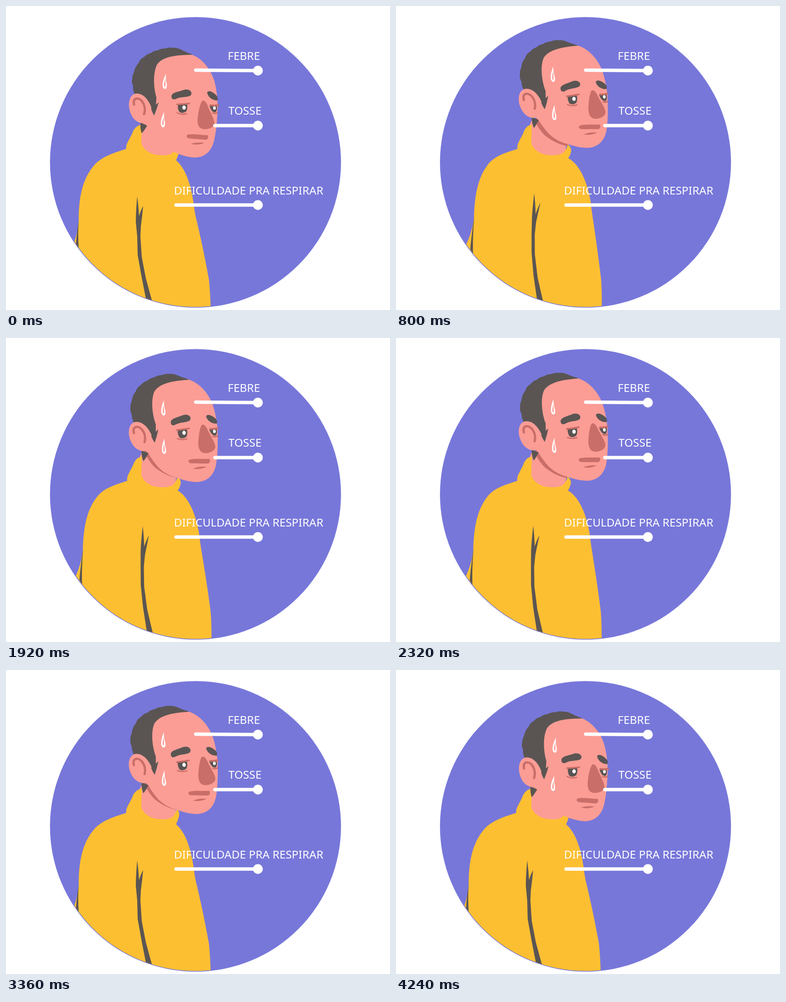
Animation of 840 by 666 pixels, one loop 4.32 s. Source, as an HTML page:

```html
<!DOCTYPE html>
<html lang="pt">
<head>
<meta charset="utf-8">
<title>Sintomas</title>
<style>
  html, body { margin: 0; width: 100%; height: 100%; overflow: hidden; background: #fff; }
  svg { display: block; width: 840px; height: 666px; }
  text { font: 24.4px "Noto Sans", "Open Sans", sans-serif; fill: #fff; }
  .skin { fill: #fb9d95; }
  .dark { fill: #5a5553; }
  .red { fill: #c96e68; }
  .white { fill: #fff; }
  .yellow { fill: #fdbf32; }
  .line { fill: none; stroke: #c96e68; stroke-linecap: round; }
  .bar { stroke: #fff; stroke-width: 7.5; stroke-linecap: round; }
</style>
</head>
<body>
<svg viewBox="0 0 840 666">
  <defs>
    <clipPath id="inner"><circle cx="414.5" cy="342.5" r="316.8"/></clipPath>
    <g id="drop">
      <path class="white" d="M350 148Q342 165 342.5 174Q344 183 349 181.500Q353 179 351.500 170Q349 162 350 148Z"/>
      <path class="skin" d="M348.500 159Q345 170 346 176.500Q349 178.500 349 173Z"/>
    </g>
  </defs>
  <circle cx="414.5" cy="342.5" r="318.3" fill="#7777da"/>
  <g clip-path="url(#inner)">
    <path class="skin" d="M297 250L288 272V330H370L372 304V250Z"/>
    <path class="red" d="M303 248Q308 265 325 283Q350 303 376 307V295L320 240Z"/>
    <path id="body" class="yellow"/>
    <path id="arm" class="dark"/>
    <path id="fold" class="dark"/>

    <g id="head">
      <path class="dark" d="M294 255L309 262Q303 272 297 279Q293 270 294 255Z"/>
      <path class="skin" d="M405 106C431 115 449 141 456 165C461 185 463 202 463 222C462 245 461 268 456 291C451 318 435 332 412 332C396 331 382 326 370 321Q345 313 329 295Q316 278 309 263L298 250L305 150L340 108Z"/>
      <path class="dark" d="M407 106Q393 101 383 95.500Q374 91 365 91.500Q357 90 349 93Q340 92.500 332 97Q324 97.500 317 103Q308 105 303 111Q293 116 290 125Q282 133 280 145Q276 152 276 160Q274 167 278 175Q277 184 282 195L300 200Q313 207 316 220Q319 232 324 240Q330 226 334 211L328 216L329 200C323 180 321 148 330 129C341 111 371 107 407 107Z"/>
      <path class="skin" d="M283 192C270 195 266 214 271 230C276 248 288 257 301 257L314 250L318 222C310 201 297 190 283 192Z"/>
      <path class="line" stroke-width="5" d="M280 216C277 200 290 200 297 208C304 217 305 228 302 237"/>
      <path class="dark" d="M362 198C362 189 378 188 390 183.500C403 181 409 190 404 196C396 201 383 198 373 203C367 206 362 205 362 198Z"/>
      <path class="dark" d="M440 190C441 185 449 186 456 192C463 197 465 203 462 207C452 207 442 200 440 190Z"/>

      <path class="dark" d="M376 216L396 214Q398 225 394 231Q387 237 379 232Q375 225 376 216Z"/>
      <ellipse class="white" cx="389.500" cy="222.500" rx="3.800" ry="4.500"/>
      <path class="line" stroke-width="3.500" d="M374 215.500Q388 215 401 213.500"/>
      <path class="line" stroke-width="2.500" d="M374 234Q384 239 395 236"/>
      <path class="dark" d="M445 219L461 218Q463 229 458 233Q450 234 445 219Z"/>
      <ellipse class="white" cx="456" cy="223.500" rx="3" ry="3.800"/>
      <path class="line" stroke-width="4" d="M447 217.500Q456 218.500 464 217"/>
      <path class="line" stroke-width="3" d="M452 234Q457 237 462 234"/>

      <path class="red" d="M429 208C434 205 438 211 441 218C445 230 456 247 456 257C455 266 444 270 435 270C423 270 419 262 419 250C420 235 424 215 429 208Z"/>
      <path class="red" d="M397 282C406 279 430 283 441 283C444 287 441 293 437 293C425 292 410 291 400 290C394 288 394 284 397 282Z"/>
      <path class="red" d="M404 302Q418 297 434 300Q420 306 404 302Z"/>
      <use href="#drop"/>
      <use href="#drop" x="-4" y="84"/>
    </g>
  </g>

  <path class="bar" d="M415 140.500L551 141.500M457 262H551M372 436H551"/>
  <circle class="white" cx="551" cy="141.500" r="10.700"/>
  <circle class="white" cx="551" cy="262" r="10.700"/>
  <circle class="white" cx="551" cy="436" r="10.700"/>
  <text x="485" y="118">FEBRE</text>
  <text x="486.500" y="238">TOSSE</text>
  <text x="367.500" y="413">DIFICULDADE PRA RESPIRAR</text>
</svg>
<script>
  const LOOP = 4320, BREATH = 1440, STEP = 80;

  // Each outline: breathed out, breathed in.
  const shapes = {
    body: [
      "M263 313C261 301 273 290 278 274Q285 261 297 260L296 300C300 315 317 327 340 327Q358 328 364 322Q371 315 374 304Q381 312 378 322Q376 330 372 338C392 355 404 388 410 430Q413 455 417 470C424 498 436 555 444 600Q447 630 448 670L100 670L149 518Q157 495 159 470C159 410 171 375 192 350C208 330 238 321 263 313Z",
      "M266 313C263 301 275 290 281 272Q287 261 297 260L296 300C300 315 317 327 340 327Q360 328 368 320Q374 312 376 303Q385 311 383 320Q381 328 377 333C400 345 418 380 426 425Q429 450 432 470C436 498 444 555 449 600Q451 630 450 670L100 670L154 522Q167 495 171 465C173 405 182 372 204 344C220 326 245 320 266 313Z"
    ],
    arm: [
      "M159 470Q155 495 153 522L159 530Q157 500 159 470Z",
      "M172 460Q166 495 163 533L169 545Q168 500 172 460Z"
    ],
    fold: [
      "M287 417Q284 450 284 473L287 505L288 545L296 590L307 646L320 648L306 597L297 550L294 505L295 483Q298 460 300 438Q294 449 291 460Q290 440 287 417Z",
      "M303 410Q299 445 298 465L297 500L297 540L301 590L309 646L322 648L310 595L304 543L304 500L307 473Q312 450 317 430Q310 444 306 456Q306 435 303 410Z"
    ]
  };

  const el = id => document.getElementById(id);
  const ease = p => (1 - Math.cos(Math.PI * p)) / 2;

  function mix([a, b], k) {
    const ends = b.match(/\d+/g);
    let i = 0;
    return a.replace(/\d+/g, n => (+n + (ends[i++] - n) * k).toFixed(2) + " ");
  }

  // The chest rises with the head, sinks a little sooner, and rests in the last breath.
  function chest(t, p) {
    if (t >= 2 * BREATH) return 0;
    return p < 0.5 ? ease(2 * p) : ease(Math.max(0, 1 - (p - 0.5) / 0.4));
  }

  function draw() {
    const t = Math.floor((performance.now() % LOOP) / STEP) * STEP;
    const p = (t % BREATH) / BREATH;
    el("head").setAttribute("transform", `rotate(${-4.9 * ease(2 * p)} 160 215)`);
    for (const id in shapes) el(id).setAttribute("d", mix(shapes[id], chest(t, p)));
    requestAnimationFrame(draw);
  }
  draw();
</script>
</body>
</html>
```
